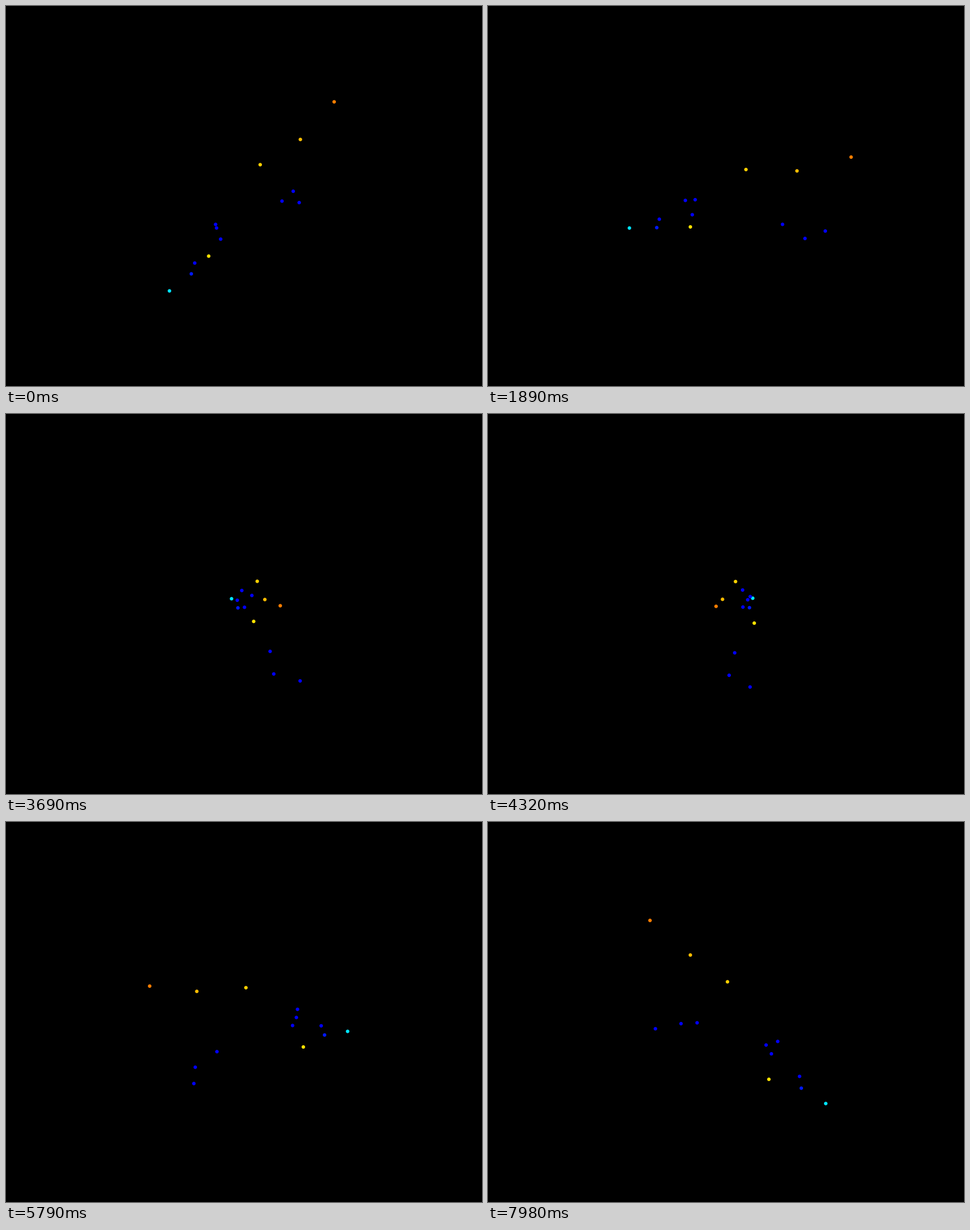
Recreate the animation shown at these times as a matplotlib script. Size 837x669 px, loop 8 s.

```python
import numpy as np
import matplotlib.pyplot as plt
from matplotlib.animation import FuncAnimation

W, H, DPI = 837, 669, 100
LOOP_MS, FRAMES = 8000, 267

# Camera: 30 degrees above the cloud, which turns 1 degree per frame.
ELEV = np.radians(30)
DIST = 2784.5
CX, CY = 435.92, 330.88

BLUE = "#0000ff"

# right, towards the viewer, up (pixels from the centre), colour
POINTS = [
    (144.7, -144.7, 108.5, "#ff7e00"),
    (82.6, -75.5, 68.4, "#ffbd00"),
    (11.0, -14.0, 51.1, "#ffd000"),
    (-79.6, 52.2, -96.4, "#ffe200"),
    (-144.7, 144.7, -108.5, "#00e5ff"),
    (-108.4, 106.1, -98.7, "#0018ff"),
    (-102.2, 103.3, -78.3, BLUE),
    (-66.8, 47.8, -33.8, BLUE),
    (-64.6, 68.2, -28.7, BLUE),
    (-58.0, 58.1, -57.6, BLUE),
    (50.9, -66.5, -53.4, BLUE),
    (83.0, -94.5, -72.9, BLUE),
    (73.1, -141.5, -75.9, BLUE),
]
RIGHT, NEAR, UP = np.array([p[:3] for p in POINTS]).T
COLORS = np.array([p[3] for p in POINTS])


def project(angle):
    """Turn the cloud about its upright axis; return screen places and depth."""
    c, s = np.cos(angle), np.sin(angle)
    right = RIGHT * c - NEAR * s
    near = RIGHT * s + NEAR * c
    depth = near * np.cos(ELEV) + UP * np.sin(ELEV)
    lift = UP * np.cos(ELEV) - near * np.sin(ELEV)
    zoom = 1 / (1 - depth / DIST)
    return np.column_stack([CX + right * zoom, CY - lift * zoom]), depth


# The small surplus keeps the pixel size from being rounded down.
fig = plt.figure(figsize=((W + 0.01) / DPI, (H + 0.01) / DPI), dpi=DPI,
                 facecolor="black")
ax = fig.add_axes([0, 0, 1, 1])
ax.set_xlim(0, W)
ax.set_ylim(H, 0)
ax.axis("off")
dots = ax.scatter(RIGHT, UP, s=20, c=COLORS, linewidths=0)


def update(frame):
    places, depth = project(np.radians(frame))
    order = np.argsort(depth)
    dots.set_offsets(places[order])
    dots.set_facecolor(COLORS[order])
    return (dots,)


anim = FuncAnimation(fig, update, frames=FRAMES, interval=LOOP_MS / FRAMES,
                     repeat=True, repeat_delay=0)
plt.show()
```
